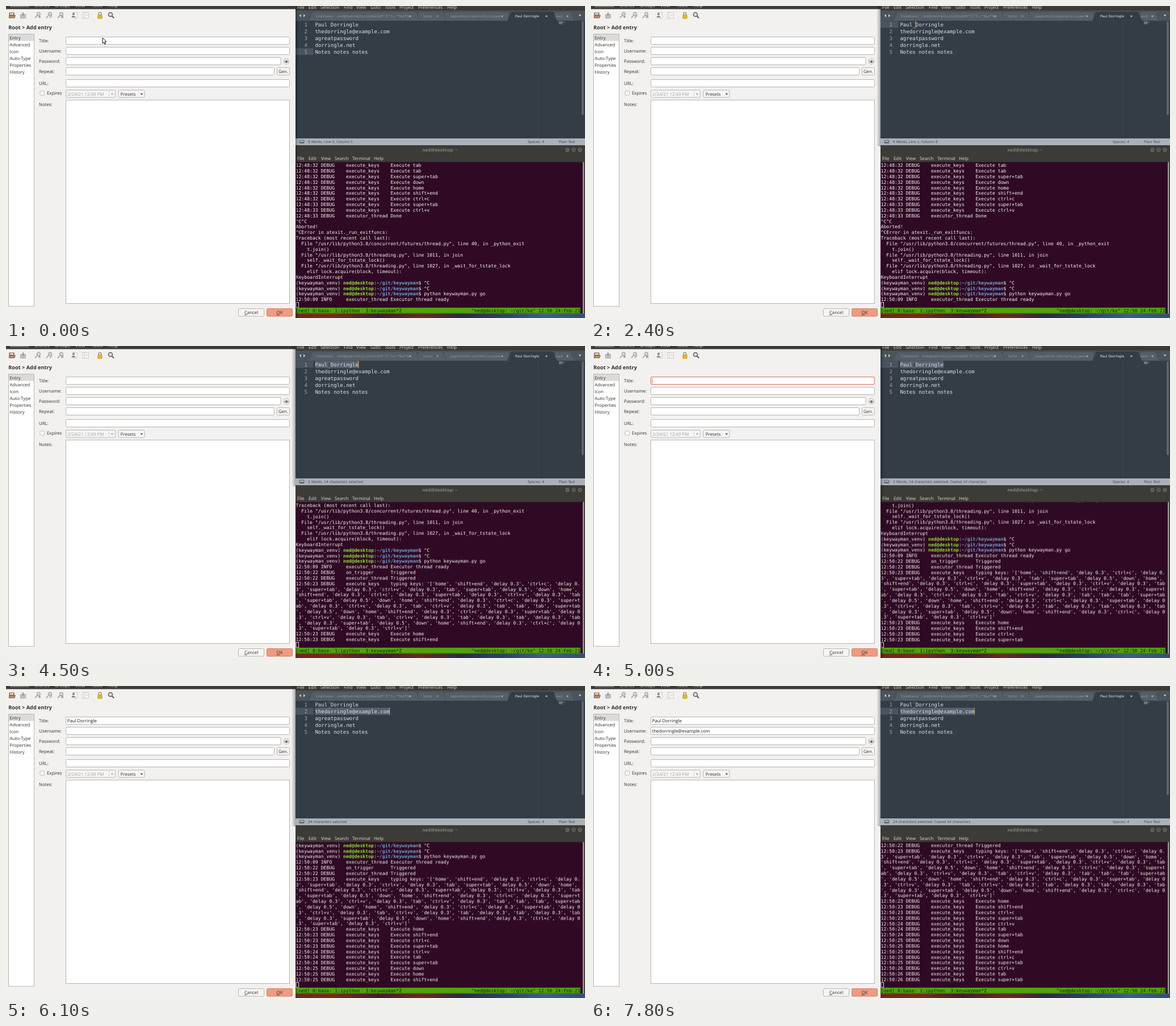
Animation, 1020 px wide and 549 px high, one loop 8 s. Source, as an HTML page:

```html
<!DOCTYPE html>
<html lang="en">
<head>
<meta charset="utf-8">
<title>Keyboard automation between two windows</title>
<style>
html, body { margin: 0; width: 100%; height: 100%; overflow: hidden; background: #f2f1f0; }
svg { display: block; width: 100vw; height: 100vh; }
text { white-space: pre; text-rendering: geometricPrecision; font: 7.85px "Open Sans", "Noto Sans", sans-serif; fill: #31302d; }
.heading { font-weight: 700; font-size: 9.2px; }
.menu { fill: #dfdbd2; }
.dim { fill: #a5a29e; }
.entry { fill: #1c1b1a; }
.mid { text-anchor: middle; }
.small { font: 6px "DejaVu Sans", sans-serif; fill: #8b929a; }
.bright { fill: #e6e9ec; }
.bar { fill: #3f464e; }
.code { font: 9.1px "DejaVu Sans Mono", monospace; fill: #d8dee9; }
.num { fill: #9aa2ab; }
.term { font: 8.16px "DejaVu Sans Mono", monospace; fill: #f6f6f4; }
.user, .path { font-weight: 700; }
.user { fill: #8ae234; }
.path { fill: #729fcf; }
.tmux { fill: #10200a; }
.box { fill: #fff; stroke: #b9b5b0; }
.btn { fill: #f6f5f4; stroke: #b9b5b0; }
.ring { fill: none; stroke: #d9705a; }

.run { animation: 8s step-end infinite; }
.log { animation-name: log; }
.left { animation-name: left; }
.right { animation-name: right; }
.move { animation-name: move; }
.arrow { animation-name: arrow; }
.beam { animation-name: beam; }
.row { animation-name: row; }
.sel1 { animation-name: sel1; }
.sel2 { animation-name: sel2; }
.caret1 { animation-name: caret1; }
.caret2 { animation-name: caret2; }
.caret3 { animation-name: caret3; }
.title { animation-name: title; }
.login { animation-name: login; }
.titleRing { animation-name: titleRing; }
.loginRing { animation-name: loginRing; }
.titleCaret { animation-name: titleCaret; }
.loginCaret { animation-name: loginCaret; }
.s0 { animation-name: s0; }
.s1 { animation-name: s1; }
.s2 { animation-name: s2; }
.s3 { animation-name: s3; }
.s4 { animation-name: s4; }
.s5 { animation-name: s5; }

/* one scrolled terminal line is 9.833px */
@keyframes log {
  0% { transform: none; }
  40% { transform: translateY(calc(-2 * 9.833px)); }
  56.25% { transform: translateY(calc(-13 * 9.833px)); }
  58.75% { transform: translateY(calc(-14 * 9.833px)); }
  62.5% { transform: translateY(calc(-15 * 9.833px)); }
  66.25% { transform: translateY(calc(-16 * 9.833px)); }
  71.25% { transform: translateY(calc(-18 * 9.833px)); }
  76.25% { transform: translateY(calc(-21 * 9.833px)); }
  80% { transform: translateY(calc(-22 * 9.833px)); }
  85% { transform: translateY(calc(-23 * 9.833px)); }
  88.75% { transform: translateY(calc(-24 * 9.833px)); }
  92.5% { transform: translateY(calc(-26 * 9.833px)); }
}
@keyframes move {
  0% { transform: translate(170px, 56px); }
  5% { transform: translate(168px, 53px); }
  6.25% { transform: translate(167px, 64px); }
  7.5% { transform: translate(170px, 88px); }
  8.75% { transform: translate(173px, 115px); }
  10% { transform: translate(174px, 137px); }
  11.25% { transform: translate(174px, 125px); }
  12.5% { transform: translate(176px, 113px); }
  13.75% { transform: translate(176px, 97px); }
  16.25% { transform: translate(176px, 94px); }
  17.5% { transform: translate(175px, 87px); }
  18.75% { transform: translate(176px, 79.5px); }
  20% { transform: translate(214px, 70px); }
  21.25% { transform: translate(300px, 50px); }
  22.5% { transform: translate(405px, 36px); }
  23.75% { transform: translate(500px, 31px); }
  25% { transform: translate(566px, 35px); }
  26.25% { transform: translate(569.5px, 33.5px); }
}
@keyframes arrow {
  0%, 7.5%, 10%, 17.5%, 20% { opacity: 1; }
  6.25%, 8.75%, 12.5%, 18.75%, 25% { opacity: 0; }
}
@keyframes beam {
  0%, 7.5%, 10%, 17.5%, 20% { opacity: 0; }
  6.25%, 8.75%, 12.5%, 18.75%, 25% { opacity: 1; }
}
@keyframes left {
  0%, 62.5%, 85% { opacity: 1; }
  26.25% { opacity: .6; }
  27.5%, 71.25%, 92.5% { opacity: 0; }
}
@keyframes right {
  0%, 62.5%, 85% { opacity: 0; }
  27.5% { opacity: .6; }
  28.75%, 71.25%, 92.5% { opacity: 1; }
}
@keyframes row {
  0% { transform: translateY(48px); }
  28.75% { transform: none; }
  76.25% { transform: translateY(12px); }
}
@keyframes sel1 { 0%, 76.25% { opacity: 0; } 56.25% { opacity: 1; } }
@keyframes sel2 { 0% { opacity: 0; } 76.25% { opacity: 1; } }
@keyframes caret1 {
  0%, 36.25%, 51.25% { opacity: 0; }
  28.75%, 43.75% { opacity: 1; }
  32.5%, 46.25% { opacity: .8; }
  33.75%, 42.5%, 47.5% { opacity: .5; }
  35%, 48.75% { opacity: .2; }
  50% { opacity: .08; }
}
@keyframes caret2 {
  0%, 62.5%, 76.25% { opacity: 0; }
  56.25%, 71.25% { opacity: 1; }
  60%, 75% { opacity: .8; }
  61.25% { opacity: .5; }
}
@keyframes caret3 {
  0%, 82.5%, 85% { opacity: 0; }
  76.25%, 92.5% { opacity: 1; }
  80%, 96.25% { opacity: .8; }
  81.25% { opacity: .4; }
  97.5% { opacity: .6; }
}
@keyframes title { 0% { opacity: 0; } 66.25% { opacity: 1; } }
@keyframes login { 0% { opacity: 0; } 88.75% { opacity: 1; } }
@keyframes titleRing { 0%, 71.25% { opacity: 0; } 62.5% { opacity: 1; } }
@keyframes loginRing { 0%, 92.5% { opacity: 0; } 85% { opacity: 1; } }
@keyframes titleCaret { 0% { transform: none; } 66.25% { transform: translateX(53px); } }
@keyframes loginCaret { 0% { transform: none; } 88.75% { transform: translateX(100px); } }
@keyframes s0 { 0% { opacity: 1; } 28.75% { opacity: 0; } }
@keyframes s1 { 0%, 56.25% { opacity: 0; } 28.75% { opacity: 1; } }
@keyframes s2 { 0%, 58.75% { opacity: 0; } 56.25% { opacity: 1; } }
@keyframes s3 { 0%, 76.25% { opacity: 0; } 58.75% { opacity: 1; } }
@keyframes s4 { 0%, 80% { opacity: 0; } 76.25% { opacity: 1; } }
@keyframes s5 { 0% { opacity: 0; } 80% { opacity: 1; } }
</style>
</head>
<body>
<svg id="stage" viewBox="0 0 1020 549" preserveAspectRatio="none"></svg>
<script>
const NAME = 'Paul Dorringle';
const MAIL = 'thedorringle@example.com';
const SITE = 'dorringle.net';
const HOST = 'ned@desktop';

const text = (x, y, s, cls = '') => `<text x="${x}" y="${y}" class="${cls}">${s}</text>`;
const rect = (x, y, w, h, fill, more = '') =>
  `<rect x="${x}" y="${y}" width="${w}" height="${h}" fill="${fill}" ${more}/>`;
const box = (x, y, w, h, cls = 'box') =>
  `<rect x="${x}" y="${y}" width="${w}" height="${h}" rx="1.8" class="${cls}"/>`;
const path = (d, fill, more = '') => `<path d="${d}" fill="${fill}" ${more}/>`;
const dot = (x, y, r, fill, more = '') => `<circle cx="${x}" cy="${y}" r="${r}" fill="${fill}" ${more}/>`;
const labels = (list, y, cls) => list.map(([x, s]) => text(x, y, s, cls)).join('');
const down = (x, y, fill) => path(`M${x - 2.3} ${y - 1.3}h4.6l-2.3 3z`, fill);

function toolbar() {
  const key = x => `<g fill="none" stroke="#b3b0ac" stroke-width="2">
    <circle cx="${x + 2.5}" cy="14" r="2.6"/><path d="M${x + .5} 16l-4.5 5"/></g>`;
  const sheet = x => rect(x - 4, 11.5, 7.5, 10, '#f8f8f7', 'stroke="#c2bfbb" stroke-width=".8"');
  const grey = 'stroke="#96938f" stroke-width="1.3"';
  return rect(5.5, 11.5, 9, 9, '#7c5a3c', 'rx="1"') + rect(7, 12.5, 6, 3, '#e8e2da') +
    path('M5 21l1.6-4.5h10L15 21z', '#b58d61', 'stroke="#6d4b30" stroke-width=".7"') +
    rect(25.5, 14.5, 9, 7, '#c3c1be', 'rx="1" stroke="#a09d99" stroke-width=".8"') + path('M30 18l-3-3.5h2V11h2v3.5h2z', '#a09d99') +
    key(55) + path('M57 19h4m-2-2v4', 'none', grey) +
    key(75) + path('M77 21l4-4.5', 'none', grey) +
    key(95) + path('M97 17l4 4m0-4l-4 4', 'none', grey) +
    sheet(122) + dot(119, 14, 2, '#85827e') + path('M115 20q4-6 8 0z', '#85827e') +
    sheet(139) + sheet(142) + path('M140 15h4m-4 2h4', 'none', 'stroke="#c4c1be" stroke-width=".7"') +
    path('M163 16v-2.3a2.3 2.3 0 0 1 4.6 0V16', 'none', 'stroke="#8d8a80" stroke-width="1.3"') +
    rect(161.7, 15.5, 7.4, 6.5, '#e5b823', 'rx="1" stroke="#b88e12" stroke-width=".7"') +
    dot(184, 15, 3.5, '#e3e3e1', 'stroke="#5f5d5a" stroke-width="1.5"') +
    path('M186.7 17.7l3.5 3.7', 'none', 'stroke="#5f5d5a" stroke-width="2"');
}

function form() {
  const tabs = ['Entry', 'Advanced', 'Icon', 'Auto-Type', 'Properties', 'History'];
  const fields = [['Title:', 54.5, 394], ['Username:', 72.5, 394], ['Password:', 90.5, 378.5],
    ['Repeat:', 108.5, 367], ['URL:', 129.5, 394]];
  const caret = (y, cls) => rect(107.7, y + 2, .9, 9.5, '#c94f38', `class="run ${cls}"`);
  return rect(0, 0, 510, 549, '#f2f1f0') + rect(0, 0, 510, 5.5, '#3c3b37') +
    labels([[7, 'Database'], [51, 'Entries'], [86, 'Groups'], [122, 'View'], [151, 'Tools'], [180, 'Help']], 2.3, 'menu') +
    toolbar() + text(4.3, 41.3, 'Root &gt; Add entry', 'heading') +
    rect(4.5, 49.5, 45, 479, '#fff', 'stroke="#b9b5b0"') + rect(5, 50, 44, 11.5, '#dddbd9') +
    tabs.map((s, i) => text(6.5, 58.8 + 12 * i, s)).join('') +
    fields.map(([s, y, w]) => text(58, y + 9.6, s) + box(105.5, y, w, 13)).join('') +
    box(105.5, 54.5, 394, 13, 'ring run titleRing') + box(105.5, 72.5, 394, 13, 'ring run loginRing') +
    text(107.7, 64, NAME, 'entry run title') + text(107.7, 82, MAIL, 'entry run login') +
    `<g class="run titleRing">${caret(54.5, 'titleCaret')}</g><g class="run loginRing">${caret(72.5, 'loginCaret')}</g>` +
    dot(494, 97.5, 5, '#f6f5f4', 'stroke="#b9b5b0"') +
    path('M490.5 98q3.5-4.4 7 0q-3.5 3.4-7 0z', '#fff', 'stroke="#55534f" stroke-width=".9"') + dot(494, 98, 1.4, '#55534f') +
    box(477.5, 108.5, 22, 13, 'btn') + text(488.4, 118, 'Gen.', 'mid') +
    box(60, 149.5, 7.5, 7.5) + text(72, 156, 'Expires') +
    box(105.5, 148, 87, 13, 'btn') + text(108.3, 157.6, '2/24/21 12:49 PM', 'dim') +
    rect(181, 149, .8, 11.5, '#cfccc8') + down(187, 155, '#a5a29e') +
    box(198, 148, 46, 13, 'btn') + text(201.7, 157.6, 'Presets') + down(239, 155, '#4c4a47') +
    text(58, 176, 'Notes:') + rect(105.5, 165.5, 394, 358, '#fff', 'stroke="#b9b5b0"') +
    box(409.5, 532.5, 45, 13.5, 'btn') + text(432, 542.2, '<tspan text-decoration="underline">C</tspan>ancel', 'mid') +
    `<rect x="459.5" y="532.5" width="45" height="13.5" rx="1.8" fill="#f09b81" stroke="#cf8062"/>` +
    text(482, 542.2, '<tspan text-decoration="underline">O</tspan>K', 'mid');
}

function editor() {
  const tab = (a, b, fill) => path(`M${a - 4} 26.3l6-14.5q.8-1.8 2.6-1.8H${b - 4.6}q1.8 0 2.6 1.8l6 14.5z`, fill, 'stroke="#414951" stroke-width=".7"');
  const rows = [NAME, MAIL, 'agreatpassword', SITE, 'Notes notes notes'];
  const caret = (x, y, n) => rect(x, y, 1, 12.5, '#f9ae58', `class="run caret${n}"`);
  const picked = '24 characters selected', words = '2 Words, 14 characters selected';
  const status = ['6 Words, Line 5, Column 5', '6 Words, Line 1, Column 6', words,
    words + '; Copied 14 characters', picked, picked + '; Copied 24 characters'];
  return rect(510, 0, 510, 8.5, '#3c3b37') +
    labels([[513, 'File'], [533, 'Edit'], [554, 'Selection'], [595, 'Find'], [617, 'View'], [642, 'Goto'],
      [667, 'Tools'], [693, 'Project'], [726, 'Preferences'], [777, 'Help']], 4.6, 'menu') +
    rect(510, 8, 510, 18.5, '#4b535b') +
    path('M520 14.2v5.6l-3.4-2.8zM524 14.2v5.6l3.4-2.8z', '#c5cad0') + down(1011, 16.5, '#d5d9dd') +
    tab(965, 997, '#555d66') + tab(770, 887, '#555d66') + tab(724, 772, '#555d66') + tab(537, 725, '#555d66') +
    rect(510, 26, 510, 207, '#343d46') + tab(887, 967, '#343d46') + rect(884, 25.8, 87, 1.5, '#343d46') +
    labels([[546, 'Codebasin'], [583, 'ned@oakmetry.co'], [637, 'zQ4w$tR"7[^h+^Nu(*%'], [735, 'temp'],
      [783, 'paperdocks.oakmetry.co.pwd'], [968, 'pwd']], 20, 'small') +
    text(897, 20, NAME, 'small bright') +
    [712, 874, 952, 989].map(x => dot(x, 18, 1.7, '#9aa1a8')).join('') +
    path('M758.3 16.3l3.4 3.4m0-3.4l-3.4 3.4', 'none', 'stroke="#9aa1a8" stroke-width=".9"') +
    rect(510, 26.3, 31.5, 12, '#4a545f', 'class="run row"') +
    rect(544.4, 26.3, 76.7, 12.4, '#56626e', 'class="run sel1"') +
    rect(544.4, 38.3, 131.5, 12.4, '#56626e', 'class="run sel2"') +
    rect(937, 26, .8, 207, '#3f4852') + rect(1014.3, 27, 3.4, 165, '#616b75', 'rx="1.7"') +
    rows.map((s, i) => text(525.5, 35.6 + 12 * i, i + 1, 'code num') + text(544.4, 35.6 + 12 * i, s, 'code') +
      rect(974, 27 + i, s.length * .45, .6, '#9199a1')).join('') +
    caret(571.6, 26.3, 1) + caret(620.4, 26.3, 2) + caret(675.2, 38.3, 3) +
    rect(510, 233, 510, 12, '#aab1b9') + rect(517, 236, 8, 5, '#aab1b9', 'stroke="#4c535a" stroke-width=".9" rx=".8"') +
    rect(517, 239.5, 8, 1.6, '#4c535a') +
    status.map((s, i) => text(532, 241, s, `small bar run s${i}`)).join('') +
    text(919, 241, 'Spaces: 4', 'small bar') + text(974, 241, 'Plain Text', 'small bar');
}

function logLines() {
  const line = (time, level, who, msg) => `12:${time} ${level.padEnd(9)}${who.padEnd(16)}${msg}`;
  const exec = (time, keys) => keys.split(' ').map(k => line(time, 'DEBUG', 'execute_keys', 'Execute ' + k));
  const prompt = cmd => `(keywayman_venv) <tspan class="user">${HOST}</tspan>:<tspan class="path">~/git/keywayman</tspan>$ ${cmd}`;
  const lib = (file, rest) => `  File "/usr/lib/python3.8/${file}", line ${rest}`;
  const copy = 'home shift+end .3 ctrl+c .3 super+tab .3 ctrl+v';
  const keys = `${copy} .3 tab super+tab .5 down ${copy} .3 tab super+tab .5 down ${copy} .3 tab ctrl+v .3 tab tab tab super+tab ` +
    `.5 down ${copy} .3 tab ctrl+v .3 tab .3 tab .3 tab .3 super+tab .5 down ${copy}`;
  const list = keys.split(' ').map(k => `'${k.replace(/^\./, 'delay 0.')}'`).join(', ');
  const typing = line('50:23', 'DEBUG', 'execute_keys', `typing keys: '[${list}]'`).match(/.{1,102}/g);
  return [
    ...exec('48:32', 'tab tab super+tab down home shift+end ctrl+c'),
    ...exec('48:33', 'super+tab ctrl+v'),
    line('48:33', 'DEBUG', 'executor_thread', 'Done'),
    '^C^C', 'Aborted!', '^CError in atexit._run_exitfuncs:', 'Traceback (most recent call last):',
    lib('concurrent/futures/thread.py', '40, in _python_exit'), '    t.join()',
    lib('threading.py', '1011, in join'), '    self._wait_for_tstate_lock()',
    lib('threading.py', '1027, in _wait_for_tstate_lock'), '    elif lock.acquire(block, timeout):',
    'KeyboardInterrupt', prompt('^C'), prompt('^C'), prompt('python keywayman.py go'),
    line('50:09', 'INFO', 'executor_thread', 'Executor thread ready'),
    line('50:22', 'DEBUG', 'on_trigger', 'Triggered'),
    line('50:22', 'DEBUG', 'executor_thread', 'Triggered'),
    ...typing,
    ...exec('50:23', 'home shift+end ctrl+c super+tab'),
    ...exec('50:24', 'ctrl+v tab super+tab'),
    ...exec('50:25', 'down home shift+end ctrl+c super+tab'),
    ...exec('50:26', 'ctrl+v tab super+tab')
  ];
}

function terminal() {
  const log = logLines().map((s, i) => text(510.5, (283.2 + 9.833 * i).toFixed(2), s, 'term')).join('');
  return rect(510, 245, 510, 30, '#3c3b37') +
    `<text x="764.5" y="255.8" class="mid" style="font-weight:700;fill:#858279">${HOST}: ~</text>` +
    [989, 1000, 1011].map(x => dot(x, 253.2, 4.2, '#66645e', 'stroke="#2e2d2a" stroke-width=".6"')).join('') +
    path('M987 253.2h4M998.4 251.6h3.2v3.2h-3.2zM1009.5 251.7l3 3m0-3l-3 3', 'none', 'stroke="#3c3b37" stroke-width=".9"') +
    labels([[513, 'File'], [533, 'Edit'], [555, 'View'], [579, 'Search'], [610, 'Terminal'], [648, 'Help']], 270.8, 'menu') +
    rect(510, 274.5, 510, 267, '#300a24') + rect(1016, 274.5, 2.5, 267, '#a39ca0') + rect(1018.5, 274.5, 1.5, 267, '#3c3b37') +
    `<g clip-path="url(#screen)"><g class="run log">${log}</g></g>` +
    rect(511, 521.6, 4.6, 8.6, 'none', 'stroke="#eeeeec" stroke-width=".9"') +
    rect(510.5, 530.8, 501.2, 9.9, '#52a20a') +
    text(510.5, 538.6, '[ned] 0:base- 1:ipython  3:keywayman*Z', 'term tmux') +
    text(820.1, 538.6, `"${HOST}: ~/git/ke" 12:50 24-Feb-21`, 'term tmux') +
    rect(510, 541.3, 510, 8, 'url(#wall)');
}

function pointer() {
  const bar = 'M-2.2-4.6q2.2 0 2.2 1.2v6.8q0 1.2-2.2 1.2M2.2-4.6q-2.2 0-2.2 1.2v6.8q0 1.2 2.2 1.2';
  return `<g class="run move"><g class="run arrow">` +
    path('M0 0v9.6l2.3-2 1.6 3.6 1.7-.8-1.6-3.5h3.1z', '#fff', 'stroke="#111" stroke-width="1"') +
    `</g><g class="run beam">` + path(bar, 'none', 'stroke="#fff" stroke-width="1.7" stroke-opacity=".6"') +
    path(bar, 'none', 'stroke="#111" stroke-width=".9"') + '</g></g>';
}

const stops = list => list.map((c, i) => `<stop offset="${i / (list.length - 1)}" stop-color="${c}"/>`).join('');
const fade = (id, a, b) => `<linearGradient id="${id}"><stop offset="0" stop-opacity="${a}"/><stop offset="1" stop-opacity="${b}"/></linearGradient>`;

document.getElementById('stage').innerHTML =
  `<defs><clipPath id="screen"><rect x="510" y="275.4" width="506" height="246.2"/></clipPath>
  <linearGradient id="wall">${stops(['#702818', '#7a2a1c', '#3a2030', '#6e281e', '#2b2a44', '#2c4262', '#3d5f82', '#34506f'])}</linearGradient>
  ${fade('toLeft', 0, .3)}${fade('toRight', .3, 0)}</defs>` +
  form() + editor() + terminal() +
  rect(510, 0, 6, 549, 'url(#toRight)', 'class="run left"') +
  rect(503, 0, 7, 247, 'url(#toLeft)', 'class="run right"') +
  pointer();
</script>
</body>
</html>
```
